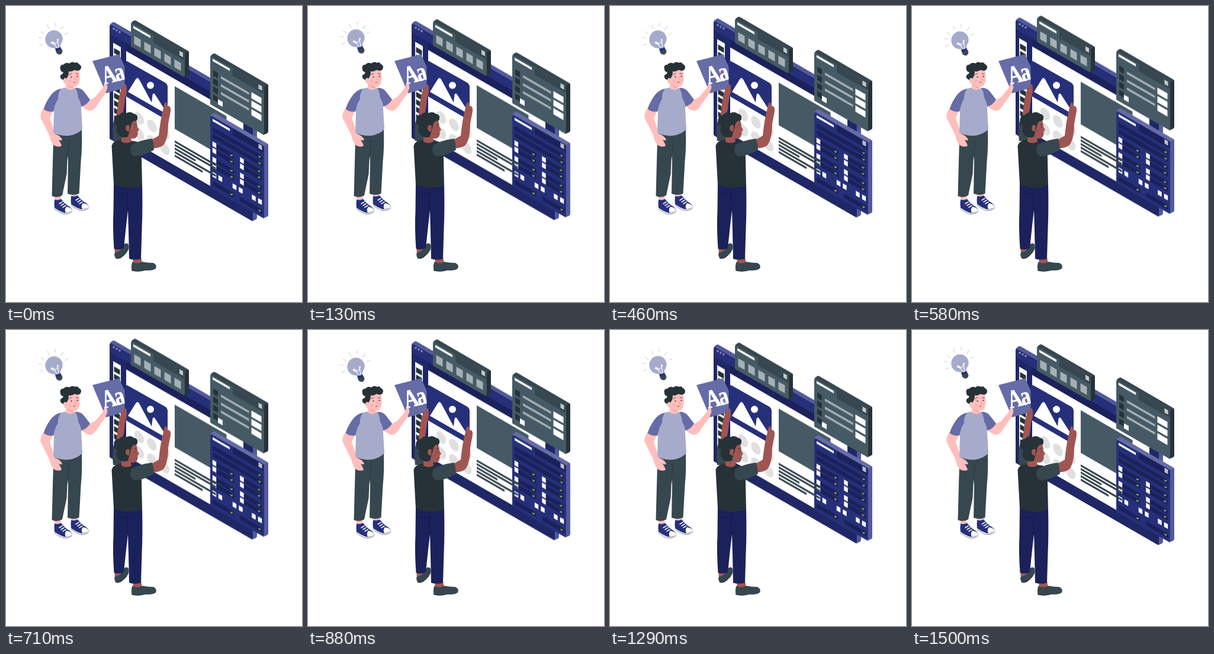
An HTML page for the animation above (1540 ms loop, 500 by 500 pixels).

```html
<!DOCTYPE html>
<html lang="en">
<head>
<meta charset="utf-8">
<title>Web design</title>
<style>
  html, body { margin: 0; width: 100%; height: 100%; overflow: hidden; background: #fff; }
  svg { display: block; width: 100vw; height: 100vh; }
</style>
</head>
<body>
<svg id="stage" viewBox="0 0 500 500"></svg>
<script>
const SLOPE = 0.577, LOOP = 1540;
const C = {
  navy: '#1f2766', deep: '#1b215a', blue: '#26307a', mid: '#535a9b', lilac: '#666ca6', pale: '#a6abcc',
  slate: '#455a64', dark: '#37474f', ink: '#263238', ash: '#a6b0b4', skin: '#ffbfbc', brown: '#9f5653',
  white: '#fff', mist: '#e0e0e0'
};

const path = (fill, d) => `<path fill="${fill}" d="${d}"/>`;
const line = (color, width, d) =>
  `<path fill="none" stroke="${color}" stroke-width="${width}" stroke-linecap="round" stroke-linejoin="round" d="${d}"/>`;
const dot = (fill, x, y, r) => `<circle fill="${fill}" cx="${x}" cy="${y}" r="${r}"/>`;
// Parallelogram lying in the isometric wall plane
const par = (fill, x, y, w, h) => path(fill, `M${x} ${y}l${w} ${w * SLOPE}v${h}l${-w} ${-w * SLOPE}z`);
const soft = (fill, x, y, w, h) => {
  const r = 2, s = r * SLOPE;
  return `<path fill="${fill}" stroke="${fill}" stroke-width="4" stroke-linejoin="round" d="M${x + r} ${y + r + s}l${w - 2 * r} ${(w - 2 * r) * SLOPE}v${h - 2 * r}l${2 * r - w} ${(2 * r - w) * SLOPE}z"/>`;
};

function box(x, y, w, h, front, top, side) {
  const right = x + w, base = y + w * SLOPE;
  return path(top, `M${x} ${y + 3}Q${x} ${y} ${x + 3} ${y - 2}L${x + 5} ${y - 3.2}Q${x + 7} ${y - 4.2} ${x + 9} ${y - 3}L${right + 5} ${base - 5}Q${right + 7} ${base - 4} ${right + 7} ${base - 1}L${right} ${base + 4}z`) +
    path(side, `M${right - 2} ${base + 1}L${right + 6.5} ${base - 4}Q${right + 7} ${base - 3} ${right + 7} ${base}V${base + h - 6}Q${right + 7} ${base + h - 4} ${right + 5} ${base + h - 3}L${right - 2} ${base + h}z`) +
    soft(front, x, y, w, h);
}

const menu = (x, y) => [0, 2.5, 5].map(d => par(C.white, x, y + d, 6, 1.7)).join('');

function browser() {
  let s = box(175, 31, 242, 193, C.navy, C.mid, C.mid);
  s += par(C.deep, 203, 62, 212, 14);
  s += par(C.blue, 176, 33, 239, 14);
  for (let i = 0; i < 3; i++) s += dot('#8388b6', 182 + i * 5, 38.3 + i * 2.8, 1.9);
  s += par(C.white, 203, 76, 198, 146);
  s += par(C.white, 181, 62, 13, 144);
  for (let i = 0; i < 11; i++) s += par(C.ink, 182.5, 71 + i * 12.6, 10, 8.5);
  for (let r = 0; r < 2; r++) for (let c = 0; c < 3; c++)
    s += `<circle r="9.5" fill="${C.mist}" transform="matrix(.866 .5 0 1 ${225 + c * 21.5} ${190 + c * 12.6 + r * 26})"/>`;
  return s + par(C.slate, 285, 135.5, 87.5, 72);
}

function toolPanel() {
  let s = box(211, 28, 91, 40, C.slate, C.dark, C.ink);
  s += par(C.dark, 249, 50, 52, 12);
  s += par(C.white, 215, 33.5, 29, 4);
  for (let i = 0; i < 5; i++) s += par(C.ash, 216.5 + i * 17, 50.5 + i * 9.85, 11, 13.5);
  return s + menu(293, 76);
}

function listPanel() {
  let s = box(345, 84, 91, 81.5, C.slate, C.dark, C.ink);
  s += par(C.dark, 383, 106, 52, 12);
  s += par(C.white, 349, 89, 29, 4);
  for (let i = 0; i < 4; i++) s += par(C.ink, 350, 108.5 + i * 13.6, 8, 9);
  s += par(C.white, 358, 157.5, 8, 8.5);
  for (let i = 0; i < 3; i++) {
    s += par(C.ash, 363, 118.5 + i * 13.4, 47.5, 4);
    s += par(C.white, 414.5, 145.5 + i * 14.3, 17, 10.5);
  }
  return s + menu(426.5, 132.5);
}

function formPanel() {
  let s = box(345, 184.5, 91, 122, C.blue, C.lilac, C.mid);
  s += par(C.deep, 383, 207, 52, 11);
  s += par(C.white, 349, 190.5, 29, 4);
  s += menu(426.5, 233);
  const field = (x, y, w) => {
    const ex = x + w - 4.5, ey = y + (w - 4.5) * SLOPE + 4;
    return par(C.deep, x, y, w, 7.5) + dot(C.ink, ex, ey, 3) +
      line(C.white, 1, `M${ex - 1.5} ${ey - .8}l1.3 1.8 1.7-.8`);
  };
  const tick = (x, y) => par(C.white, x - 3.2, y - 6, 6.4, 8);
  for (const y of [204.5, 215.5]) s += field(349, y, 84);
  for (let c = 0; c < 2; c++) for (const y of [234, 244.5, 260, 270.5]) {
    const x = 352 + c * 46.5, v = y + c * 26.8;
    s += field(x + 3, v - 1, 30.5) + tick(x, v + .5);
  }
  for (const x of [352, 362, 386, 396.5, 418.5, 429]) s += tick(x, 286 + (x - 352) * SLOPE);
  return s + field(349, 295.5, 36.5) + field(395.5, 322.5, 37.5);
}

function copyLines() {
  return [69.5, 69.5, 35, 69.5, 47].map((w, i) => par(C.dark, 285, 227 + i * 6, w, 3.6)).join('');
}

function bulb() {
  const rays = 'M57 66l5-2M54.5 53l5.5 1M59.5 43l4.5 4M70 32l2.5 6M83 29v5M96.5 34.5l-4 5.5M99 48l5.5-2.5';
  return line(C.mist, 1.6, rays) +
    path(C.pale, 'M83.5 71Q74 72 69 65C62 54 70 41 81 41C93 41 99 54 94 62Q91 66 92 70z') +
    line(C.white, 1.2, 'M86 71L80 61M89 70L87 58M78 60Q79 65 83 63Q87 62 88 57M76 62l6 3') +
    dot(C.white, 77.5, 61.5, 1.6) + dot(C.white, 87.5, 57, 1.6) +
    path(C.blue, 'M83 71Q88 72 92 69L94 74Q89 77 84 76z') +
    path(C.dark, 'M84 75Q90 76 94 72L95.5 77Q94.5 81 91.5 82Q87 82 85 79z');
}

function sneaker(dx, dy) {
  return `<g transform="translate(${dx} ${dy})">` +
    path(C.skin, 'M81 319L92 320L93 329L83 329z') +
    path(C.white, 'M81.5 336L82 343Q90 349 97 351.5Q106 353 112 347L110 341z') +
    path(C.blue, 'M82 327Q88 329 93 326Q97 332 104 337Q112 341 111.5 346Q105 351 97 349Q89 346 82 341Q81 333 82 327z') +
    path(C.white, 'M102 339Q112 341 111.5 346Q107 349 101 349Q98 344 102 339z') +
    line(C.white, 1.5, 'M90 334l5-3M93 337l5-3M96 340l5-3') +
    line(C.ink, .6, 'M82 343Q90 349 97 351.3Q106 352.6 111.5 347.5') + '</g>';
}

function designer() {
  return sneaker(0, 0) + sneaker(28, -6) +
    path(C.dark, 'M80.5 212Q105 224 128 207Q129 240 126.5 262L123.5 317Q114 321 104 317L105 262L104 252L102.5 284L95 320Q86 325 77.5 321L79 262z') +
    line(C.ink, .7, 'M106 226Q107 238 103 256') +
    path(C.skin, 'M64 172Q57 181 58.5 189L73 218Q76 232 82 236Q90 239 94 236Q92 230 89 226Q94 228 95 226Q92 219 83 216L74 189L80 176z') +
    path(C.skin, 'M127 168L141 159L152 153L163 139Q165 131 170 130L172 138L169 146L156 164Q150 176 143 177Q135 177 127 168z') +
    path(C.pale, 'M100 138Q91 139 86 144Q80 150 81 176L80 214Q91 220 106 219Q121 217 129 208L127 174Q127 148 122 139z') +
    path(C.lilac, 'M93 139.5Q81 142 74 153Q67 163 63.5 174Q71 180 80.5 178Q82 166 88 157Q87 148 93 139.5z') +
    path(C.lilac, 'M117 138Q127 138 132 145L142 158Q137 167 127 170Q126 161 122 155Q121 145 117 138z') +
    path(C.skin, 'M101 123L101 139Q107 144 115 140L114 131z') +
    path(C.skin, 'M105 108Q115 103 123 108Q126.5 122 123 131Q120 138 112 137Q102 134 100 128z') +
    path('#f2a29f', 'M103 131Q107 136 113 137L113 139Q106 138 103 131z') +
    path(C.ink, 'M92 107Q90 99 97 99Q101 94 107 97Q112 93 116 96Q121 94 123 98Q129 101 126 107Q123 111 116 108Q109 112 106 110Q106 118 103 121L100 131Q97 127 97 125Q90 122 92 117Q96 115 97 112Q92 111 92 107z') +
    path(C.skin, 'M103 123Q98 119 97 125Q97 132 103 132z') +
    dot(C.ink, 110.5, 120, 1.1) + dot(C.ink, 120.5, 119, 1.1) +
    line(C.ink, .8, 'M107 116l4-2M118 114l4 1M114 129q1.5 1 3-.5') +
    line('#ed8885', .7, 'M116.5 120l1.5 4-1.5 .7') + dot('#f9b0ae', 108, 127, 2.2) + dot('#f9b0ae', 120.5, 125.5, 1.6);
}

// The lettering shares the tilted plane of the card
function typeCard() {
  return path(C.lilac, 'M146 93L191 81.5L215 134L169 147.5z') +
    `<text transform="matrix(.75 -.19 .28 .97 166 132.5)" font-family="Liberation Serif, Times New Roman, serif" font-weight="700" font-size="43" letter-spacing="-3" fill="#fff" stroke="#fff" stroke-width=".8">Aa</text>` +
    path(C.skin, 'M151 153L163 140Q165 132 170 130L171.5 138L168 147L157 163z');
}

function pictureCard() {
  return path(C.blue, 'M200.5 97Q200.5 91 206 94L269 129.5Q273 132 273 137V184Q273 193 267 190L205 154Q200.5 151 200.5 146z') +
    path(C.white, 'M206 145L219 124Q222 119 225 124L246 163L247.5 150Q249 146 251.5 149L267 173V180z') +
    dot(C.white, 244, 134, 6);
}

function builder() {
  return path(C.brown, 'M186 190L190 158Q193 139 201 132Q205 132 204 145L201 158L199 174L195 191z') +
    path(C.dark, 'M181 228Q178 200 185 185Q194 188 199 188L201 228z') +
    path(C.brown, 'M183 407L197 408L196 417L184 418zM214 424L228 424L230 435L215 436z') +
    path(C.dark, 'M183.5 417Q195 415 198 404Q203 398 207 403Q209 411 203 417Q195 428 187 427Q182 424 183.5 417z') +
    path(C.dark, 'M213.5 432Q222 437 230 432Q239 434 249 434Q255 437 253.5 442Q250 447 236 446Q225 450 213 447.5Q210.5 440 213.5 432z') +
    line(C.ink, 1, 'M212 446Q224 450 235 446Q249 447 253 443M185 426Q195 427 204 416') +
    path(C.deep, 'M182 300Q206 310 230 302Q231 345 229.5 377L228 427Q218 430 208 427L207 380L206 345L203 371L199 409Q191 413 182.5 410Q180 374 181.5 347z') +
    line('#11163f', .8, 'M206 310Q204 325 206 346M188 315Q196 319 204 316') +
    path(C.brown, 'M246 226L258 219Q261 190 266 172Q267 163 271 162L273 169Q279 168 278 178L274 199Q274 224 266 235Q258 241 248 240z') +
    path(C.ink, 'M194 226Q181 227 178.5 236L182 301Q206 312 230 303L229 257Q229 235 221 229z') +
    path(C.brown, 'M195 212L195 229Q203 234 212 229L211 222z') +
    path(C.brown, 'M202 191L220 193Q222 200 222 204L225 209L222.5 212Q223 220 219 223Q210 226 203 219z') +
    path(C.ink, 'M188 203Q180 200 184 192Q182 184 191 184Q195 178 203 181Q210 177 216 182Q223 183 222 190Q222 195 216 194Q211 198 211 203L208 213L206 221Q196 224 190 218Q184 211 188 203z') +
    path(C.brown, 'M209 202Q203 199 202 206Q202 212 208 212z') +
    line(C.ink, .9, 'M217 201l3-1M218 205v1') + line('#7c3c3c', .8, 'M218 217l4-1') +
    path(C.dark, 'M212 235Q223 227 247 224Q250 233 250 243Q234 253 217 254Q210 251 210 242z');
}

document.getElementById('stage').innerHTML =
  `<g id="wall">${browser()}${toolPanel()}${listPanel()}${formPanel()}${copyLines()}</g>` +
  `<g id="bulb">${bulb()}</g>` +
  designer() + typeCard() + pictureCard() + builder();

function float(id, steps) {
  const frames = steps.map(([ms, y]) => ({ offset: ms / LOOP, transform: `translateY(${y}px)` }));
  document.getElementById(id).animate(frames, { duration: LOOP, iterations: Infinity, easing: 'linear' });
}
float('wall', [[0, 0], [750, -10], [1500, 0], [1540, 0]]);
float('bulb', [[0, 0], [225, -3], [975, 7], [1500, 0], [1540, 0]]);
</script>
</body>
</html>
```
